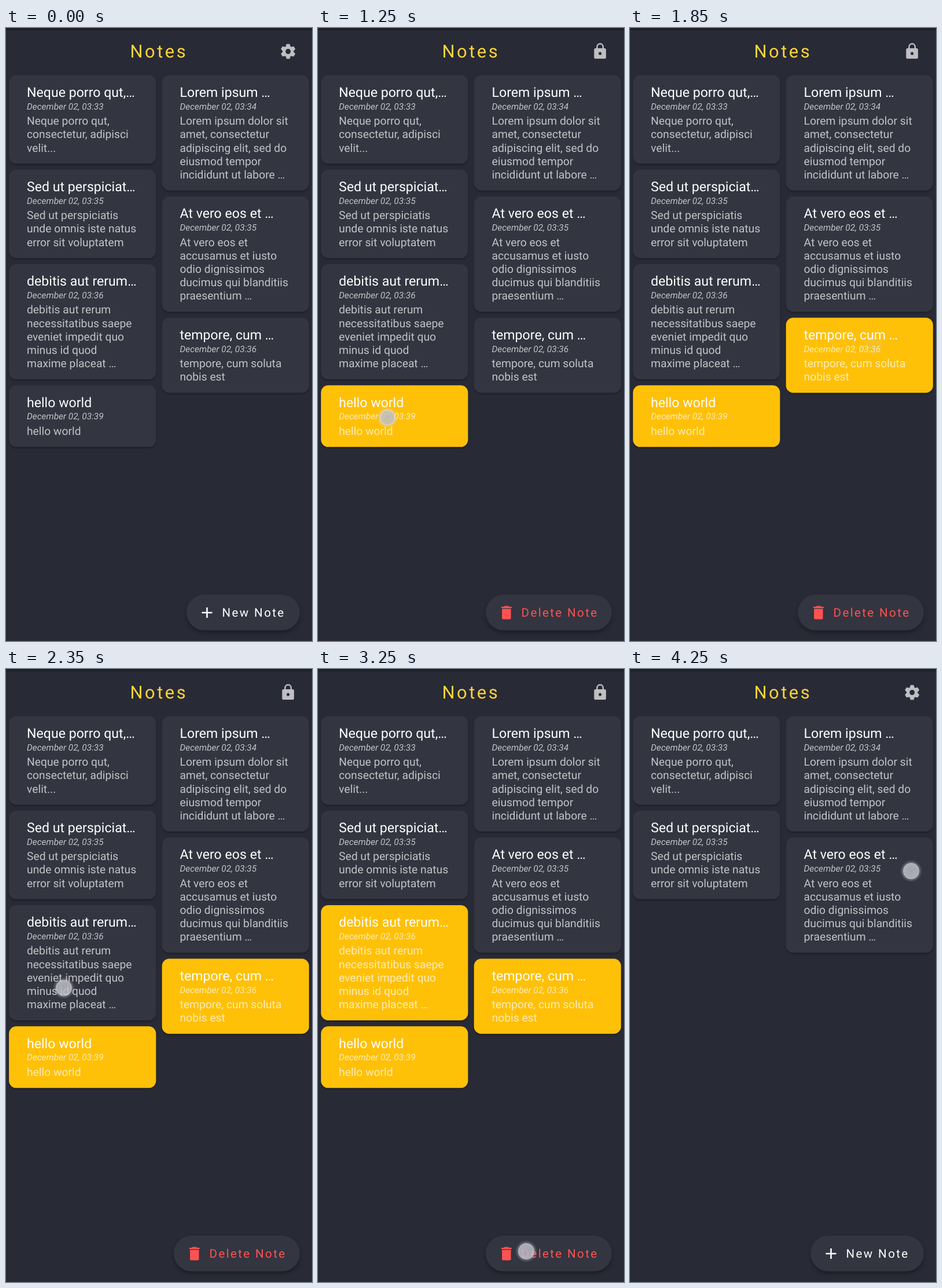
Animation, 529 px wide and 1059 px high, one loop 4.3 s. Source, as an HTML page:

```html
<!DOCTYPE html>
<html lang="en">
<head>
<meta charset="utf-8">
<title>Notes</title>
<style>
html, body { margin: 0; width: 100%; height: 100%; overflow: hidden; background: #282a35; }
svg { display: block; width: 100%; height: 100%; font-family: Roboto, sans-serif; fill: #fff; text-rendering: geometricPrecision; }
.card, .pill { fill: #333540; filter: drop-shadow(0 2px 1.5px rgba(0,0,0,.28)); }
.on .card { fill: #ffc008; }
.title { font-size: 23.14px; }
.date { font-size: 15.43px; font-style: italic; opacity: .7; }
.body { font-size: 19.29px; opacity: .7; }
.head { font-size: 30.86px; letter-spacing: 3.5px; fill: #ffd43a; }
.label { font-size: 20.57px; letter-spacing: 2.35px; }
.icon { opacity: .7; }
.pill { filter: drop-shadow(0 4px 3px rgba(0,0,0,.3)); }
.red { fill: #ff5252; }
</style>
</head>
<body>
<svg id="stage" viewBox="0 0 529 1059" xmlns="http://www.w3.org/2000/svg">
  <defs>
    <radialGradient id="touch">
      <stop offset="0" stop-color="#b8b8c2" stop-opacity=".86"/>
      <stop offset=".6" stop-color="#c3c3cb" stop-opacity=".84"/>
      <stop offset=".7" stop-color="#dcdce2" stop-opacity=".78"/>
      <stop offset=".77" stop-color="#d0d0d8" stop-opacity=".3"/>
      <stop offset="1" stop-color="#d0d0d8" stop-opacity="0"/>
    </radialGradient>
    <clipPath id="pillClip"><rect id="pillShape" y="979" height="61.5" rx="30.75"/></clipPath>
  </defs>
  <rect width="529" height="1059" fill="#282a35"/>
  <rect width="529" height="4" fill="#1f2129"/>
  <text class="head" x="214.6" y="51">Notes</text>
  <g id="gear" class="icon" transform="translate(487.7 40.5) scale(1.3)">
    <circle r="5.4" fill="none" stroke="#fff" stroke-width="4"/>
  </g>
  <g id="lock" class="icon" transform="translate(472.2 24.8) scale(1.286)">
    <path fill-rule="evenodd" d="M18 8h-1V6a5 5 0 0 0-10 0v2H6a2 2 0 0 0-2 2v10a2 2 0 0 0 2 2h12a2 2 0 0 0 2-2V10a2 2 0 0 0-2-2zM12 17a2 2 0 1 1 0-4 2 2 0 0 1 0 4zM15.1 8H8.9V6a3.1 3.1 0 0 1 6.2 0z"/>
  </g>
  <g id="cards"></g>
  <rect id="pill" class="pill" y="979" height="61.5" rx="30.75"/>
  <g clip-path="url(#pillClip)"><circle id="ripple" fill="#ccc"/></g>
  <g id="create">
    <path d="M338.5 1010h18M347.5 1001v18" stroke="#fff" stroke-width="2.6"/>
    <text class="label" x="373.6" y="1016.8">New Note</text>
  </g>
  <g id="remove" class="red">
    <path transform="translate(310.4 994.6) scale(1.286)" d="M6 19a2 2 0 0 0 2 2h8a2 2 0 0 0 2-2V7H6zM19 4h-3.5l-1-1h-5l-1 1H5v2h14z"/>
    <text class="label" x="351.6" y="1016.8">Delete Note</text>
  </g>
  <circle id="dot" r="19" fill="url(#touch)"/>
</svg>
<script>
const LOOP = 4300, SELECT_MODE = 1250, CONFIRM = 3250, DELETED = 3270;
const GAP = 10.29, LINE = 23.15;
const $ = id => document.getElementById(id);

function set(el, attrs) {
  for (const key in attrs) el.setAttribute(key, attrs[key]);
}

function add(parent, tag, attrs, text) {
  const el = document.createElementNS("http://www.w3.org/2000/svg", tag);
  set(el, attrs);
  if (text) el.textContent = text;
  return parent.appendChild(el);
}

// Each note: title, time, body lines, moment of selection
const columns = [
  { x: 5.14, notes: [
    ["Neque porro qut,…", "03:33", "Neque porro qut,|consectetur, adipisci|velit..."],
    ["Sed ut perspiciat…", "03:35", "Sed ut perspiciatis|unde omnis iste natus|error sit voluptatem"],
    ["debitis aut rerum…", "03:36", "debitis aut rerum|necessitatibus saepe|eveniet impedit quo|minus id quod|maxime placeat …", 2390],
    ["hello world", "03:39", "hello world", SELECT_MODE]
  ] },
  { x: 269.64, notes: [
    ["Lorem ipsum …", "03:34", "Lorem ipsum dolor sit|amet, consectetur|adipiscing elit, sed do|eiusmod tempor|incididunt ut labore …"],
    ["At vero eos et …", "03:35", "At vero eos et|accusamus et iusto|odio dignissimos|ducimus qui blanditiis|praesentium …"],
    ["tempore, cum …", "03:36", "tempore, cum soluta|nobis est", 1790]
  ] }
];

const selectable = [];
for (const { x, notes } of columns) {
  let top = 81.6;
  for (const [title, time, body, at] of notes) {
    const lines = body.split("|");
    const height = 83.4 + LINE * lines.length;
    const left = x + 30.86;
    const g = add($("cards"), "g", {});
    add(g, "rect", { class: "card", x, y: top, width: 254.2, height, rx: 12.5 });
    add(g, "text", { class: "title", x: left, y: top + 37.3 }, title);
    add(g, "text", { class: "date", x: left, y: top + 59.1 }, "December 02, " + time);
    lines.forEach((line, i) =>
      add(g, "text", { class: "body", x: left, y: top + 85.6 + LINE * i }, line));
    if (at) selectable.push({ g, at });
    top += height + GAP;
  }
}

for (let a = 0; a < 360; a += 60)
  add($("gear"), "path", { d: "M-3-6L-2-9.6H2L3-6z", transform: `rotate(${a})`,
    stroke: "#fff", "stroke-width": .5, "stroke-linejoin": "round" });

// Touches: x, y, press time, release time
const touches = [
  [120, 673, 700, 1300],
  [421, 548, 1640, 1760],
  [100, 551, 2190, 2360],
  [360, 1006, 3100, CONFIRM],
  [486, 349, 4150, LOOP]
];

const clamp = v => Math.max(0, Math.min(1, v));
const show = (el, on) => el.setAttribute("visibility", on ? "visible" : "hidden");

function draw(t) {
  const selecting = t >= SELECT_MODE && t < DELETED;
  for (const { g, at } of selectable) {
    show(g, t < DELETED);
    g.setAttribute("class", t >= at ? "on" : "");
  }
  show($("gear"), !selecting);
  show($("lock"), selecting);
  show($("create"), !selecting);
  show($("remove"), selecting);
  const span = selecting ? { x: 290, width: 218 } : { x: 312, width: 196 };
  set($("pill"), span);
  set($("pillShape"), span);

  // The splash drifts to the button's centre while it spreads and fades
  const grow = clamp((t - CONFIRM) / 115);
  set($("ripple"), { cx: 360 + 50 * grow, cy: 1006 + 4 * grow, r: 148 * grow,
    opacity: .25 * (1 - clamp((t - CONFIRM) / 200)) });

  const touch = touches.find(([, , down, up]) => t >= down && t < up + 110);
  show($("dot"), touch);
  if (touch) {
    const [cx, cy, down, up] = touch;
    set($("dot"), { cx, cy, opacity: Math.min(clamp((t - down) / 20), 1 - clamp((t - up) / 110)) });
  }
}

const start = performance.now();
function frame() {
  draw((performance.now() - start) % LOOP);
  requestAnimationFrame(frame);
}
draw(0);
requestAnimationFrame(frame);
</script>
</body>
</html>
```
